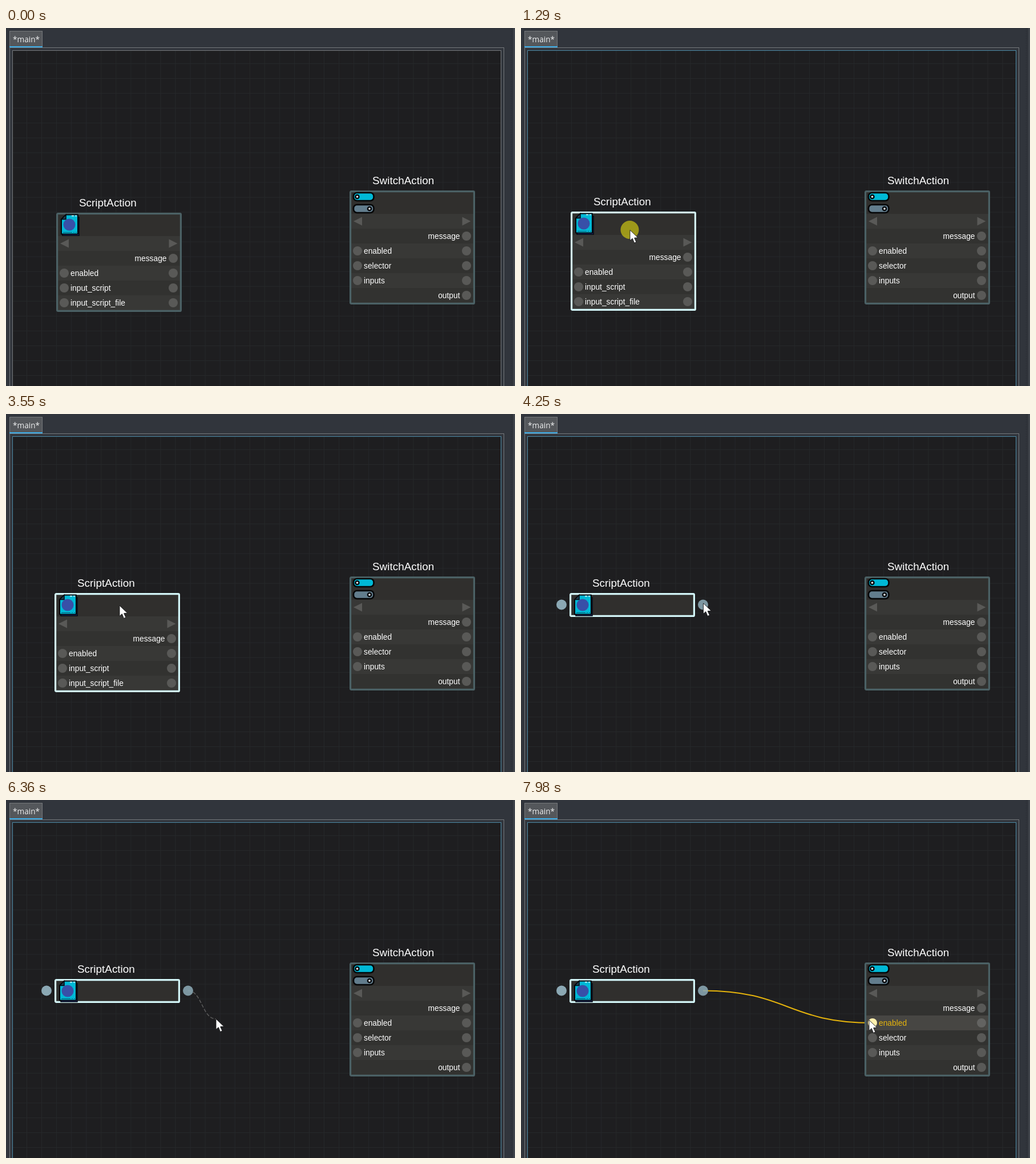
An HTML page for the animation above (8 s loop, 892x628 px).

```html
<!DOCTYPE html>
<html lang="en">
<head>
<meta charset="utf-8">
<title>Node editor</title>
<style>
  html, body { margin: 0; width: 100%; height: 100%; overflow: hidden; background: #31353c; }
  svg { display: block; width: 100vw; height: 100vh; }
  text { fill: #fff; white-space: pre; }
  .title { font: 18.9px "Liberation Sans", Arial, sans-serif; }
  .plug { font: 13.8px "Liberation Sans", Arial, sans-serif; }
  .menu { font: 14.5px "Open Sans", "Noto Sans", sans-serif; fill: #eff0f1; }
  .tab { font: 13.6px "Open Sans", "Noto Sans", sans-serif; fill: #eff0f1; }
</style>
</head>
<body>
<svg id="stage" viewBox="0 0 892 628" preserveAspectRatio="none"></svg>
<script>
const LOOP = 8000, STEP = 70;
const GREY = '#76797c', BLUE = '#4c8aa6';
const NODE_W = 220, ROW_H = 26, HEAD = 41;
const REST = [192, 357], SCRIPT = [88, 324], SWITCH = [602, 285];
const PLUG = [616, 391];

// Pointer keys: time, x, y. Motion between keys advances in steps.
const KEYS = [
  [200, 656, 570], [340, 560, 524], [480, 400, 448], [620, 250, 384], [760, 192, 357],
  [1020, 192, 357], [1290, 191, 354.5], [1420, 190.5, 353], [1690, 189, 347],
  [3140, 189, 347], [3350, 199, 337], [3550, 199, 336],
  [3620, 200, 336], [3900, 262, 337], [4250, 319.5, 332],
  [4990, 319.5, 332], [5200, 331, 351], [5340, 346, 370], [5550, 361, 388],
  [6290, 361, 388], [6360, 368, 384], [6510, 410, 389], [6860, 562, 404], [7110, 612, 403],
  [7180, 612, 399], [7250, 611, 396], [7780, 611, 396], [7850, 611, 392], [7980, 610, 386]
];
const PRESSES = [[1020, 1690], [4650, 4790], [5820, 5960], [7580, 7780]];

const rect = (x, y, w, h, fill, extra = '') =>
  `<rect x="${x}" y="${y}" width="${w}" height="${h}" fill="${fill}" ${extra}/>`;
const dot = (x, y, r, fill, extra = '') =>
  `<circle cx="${x}" cy="${y}" r="${r}" fill="${fill}" ${extra}/>`;
const path = (d, fill, extra = '') => `<path d="${d}" fill="${fill}" ${extra}/>`;
const label = (x, y, cls, str, extra = '') =>
  `<text x="${x}" y="${y}" class="${cls}" ${extra}>${str}</text>`;

function grid() {
  let d = '';
  for (let x = 36.5; x < 867; x += 26.05) d += `M${x.toFixed(1)} 40V628`;
  for (let y = 62.5; y < 628; y += 26.05) d += `M12 ${y.toFixed(1)}H867`;
  return path(d, 'none', 'stroke="#26282a"');
}

// Each plug: name, has input, has output
function rows(id, plugs) {
  let out = rect(2, HEAD, NODE_W - 4, ROW_H, '#383836') +
    path('M7 54L22 46.5V61.5zM212.500 54L197.500 46.500V61.500z', '#595957');
  plugs.forEach(([name, input], i) => {
    const cy = 80 + i * ROW_H, key = id + '-' + name;
    out += rect(2, cy - 13, NODE_W - 4, ROW_H, i % 2 ? '#383836' : '#323230', `id="${key}-row"`);
    if (input) out += dot(14, cy, 8, '#595957', `id="${key}-in"`);
    out += dot(205, cy, 8, '#595957', `id="${key}-out"`);
    out += input ? label(25, cy + 5, 'plug', name, `id="${key}-text"`)
                 : label(193.5, cy + 5, 'plug', name, 'text-anchor="end"');
  });
  return out;
}

function node(id, title, plugs, icon) {
  const h = 44 + (plugs.length + 1) * ROW_H;
  return `<g id="${id}">` +
    `<g id="${id}-ends">${dot(-14, 20.5, 9, '#8ba8b4')}${dot(234, 20.5, 9, '#8ba8b4', 'opacity=".88"')}</g>` +
    rect(1, 1, NODE_W - 2, 40, '#302f2d') +
    `<g id="${id}-body">${rect(1, HEAD, NODE_W - 2, h - HEAD - 1, '#323230')}${rows(id, plugs)}</g>` +
    rect(1.6, 1.6, NODE_W - 3.2, h - 3.2, 'none', `id="${id}-edge" rx="1.5" stroke="#4b6165" stroke-width="3.2"`) +
    label(40, -11, 'title', title) + icon + '</g>';
}

const scriptIcon =
  path('M12 8H40V40H11z', '#25378c', 'stroke="#05070c" stroke-width="1.5"') +
  path('M17 3.500H38V37.500H9V11.500z', '#00b9d6', 'stroke="#05070c" stroke-width="2" stroke-linejoin="round"') +
  path('M17 3.500V11.500H9z', '#1d3f55', 'stroke="#05070c" stroke-width="1.500"') +
  path('M27 5.500H31M33 5.500H36', 'none', 'stroke="#e8fbff" stroke-width="1.500"') +
  path('M12 34.500H28M30 34.500H32M34 34.500H36', 'none', 'stroke="#075a70" stroke-width="1.200"') +
  dot(23, 21, 10.5, '#3850a8');

const toggle = (y, fill, x) =>
  rect(7, y, 35.5, 14, fill, 'rx="6" stroke="#050607" stroke-width="2.6"') +
  dot(x, y + 7, 4.3, '#07090c') + dot(x, y + 7, 1.8, '#f4f8f8');

const items = ['execution', 'message', 'enabled', 'input_script', 'input_script_file'];
const menu = `<g id="menu">` +
  rect(319, 331, 230, 174, '#15171a', 'opacity=".6"') +
  rect(321, 333, 226, 170, '#232629', `stroke="${GREY}" stroke-width="1.6"`) +
  rect(322, 334, 224, 24, '#18465d', 'id="pick"') +
  items.map((s, i) => label(324.5, 352.5 + i * 23.8, 'menu', s)).join('') + '</g>';

const stage = document.getElementById('stage');
stage.innerHTML =
  rect(0, 0, 892, 628, '#31353c') +
  rect(6.5, 34.5, 866, 600, 'none', `stroke="${GREY}"`) +
  rect(6.5, 5.5, 57, 28, '#54575b', `stroke="${GREY}"`) +
  rect(6, 32, 58, 2, '#3daee9') +
  label(12, 24.5, 'tab', '*main*') +
  path('M885.500 0V628', 'none', 'stroke="#23262b" stroke-dasharray="1 2"') +
  path('M890.500 0V628', 'none', 'stroke="#565a60"') +
  rect(11.5, 39.5, 856, 600, '#1e1e20', 'id="view"') +
  grid() +
  path('', 'none', 'id="wire"') +
  node('script', 'ScriptAction',
    [['message', 0], ['enabled', 1], ['input_script', 1], ['input_script_file', 1]], scriptIcon) +
  node('switch', 'SwitchAction',
    [['message', 0], ['enabled', 1], ['selector', 1], ['inputs', 1], ['output', 0]],
    toggle(4, '#00b9d6', 13.5) + toggle(25, '#627d8d', 35)) +
  menu +
  `<g id="pointer">${dot(-0.5, -0.5, 16, '#d6cf12', 'id="press" opacity=".66"')}` +
  path('M0 0V18.500L4.300 14.700L7.500 22.500L11 21L7.700 13.700L13.800 13.300z', '#fff',
    'stroke="#17181a" stroke-width=".9" stroke-linejoin="round"') + '</g>';

const el = id => document.getElementById(id);
const set = (id, name, value) => el(id).setAttribute(name, value);
const show = (id, on) => set(id, 'visibility', on ? 'visible' : 'hidden');
const place = (id, [x, y]) => set(id, 'transform', `translate(${x} ${y})`);
const within = (t, [a, b]) => t >= a && t < b;

function pointerAt(t) {
  let i = 0;
  while (i < KEYS.length - 1 && KEYS[i + 1][0] <= t) i++;
  const a = KEYS[i], b = KEYS[i + 1];
  if (!b || t < a[0]) return [a[1], a[2]];
  const p = Math.floor((t - a[0]) / STEP) * STEP / (b[0] - a[0]);
  return [a[1] + (b[1] - a[1]) * p, a[2] + (b[2] - a[2]) * p];
}

function curve([x1, y1], [x2, y2]) {
  const mid = (x1 + x2) / 2;
  return `M${x1} ${y1}C${mid} ${y1} ${mid} ${y2} ${x2} ${y2}`;
}

function draw(t) {
  const tip = pointerAt(t);
  show('pointer', t >= 200);
  place('pointer', tip);
  show('press', PRESSES.some(p => within(t, p)));

  const chosen = t >= 1020;
  const grip = pointerAt(Math.min(Math.max(t, 1020), 1690));
  const pos = [SCRIPT[0] + grip[0] - REST[0], SCRIPT[1] + grip[1] - REST[1]].map(Math.round);
  const folded = within(t, [1950, 2750]) || t >= 3620;
  place('script', pos);
  place('switch', SWITCH);
  show('script-body', !folded);
  show('script-ends', folded);
  show('switch-ends', false);
  set('script-edge', 'height', folded ? 38.8 : 170.8);
  set('script-edge', 'stroke', chosen ? '#d2f5f7' : '#4b6165');
  set('view', 'stroke', chosen && !within(t, [5820, 5890]) ? BLUE : GREY);

  show('menu', within(t, [4720, 5890]));
  const row = Math.max(0, Math.min(4, Math.floor((tip[1] - 334) / 23.8)));
  show('pick', within(t, [5060, 5890]));
  set('pick', 'y', 334 + row * 23.8);

  const linked = t >= 7580;
  const hover = t > 6800 && tip[0] > 604 && tip[1] > 378 && tip[1] < 404.5;
  show('wire', t >= 5890);
  set('wire', 'd', curve([319, 334.5], hover ? PLUG : tip));
  set('wire', 'stroke', linked ? '#e6b40c' : '#5c5c5c');
  set('wire', 'stroke-width', linked ? 2 : 1.5);
  set('wire', 'stroke-dasharray', linked ? 'none' : '6 3');
  set('switch-enabled-row', 'fill', hover ? '#474643' : '#383836');
  set('switch-enabled-out', 'fill', hover ? '#636361' : '#595957');
  set('switch-enabled-in', 'fill', linked ? '#fff0ae' : hover ? '#636361' : '#595957');
  el('switch-enabled-text').style.fill = linked ? '#e6b40c' : '#fff';
}

const start = performance.now();
function tick() {
  draw((performance.now() - start) % LOOP);
  requestAnimationFrame(tick);
}
tick();
</script>
</body>
</html>
```
